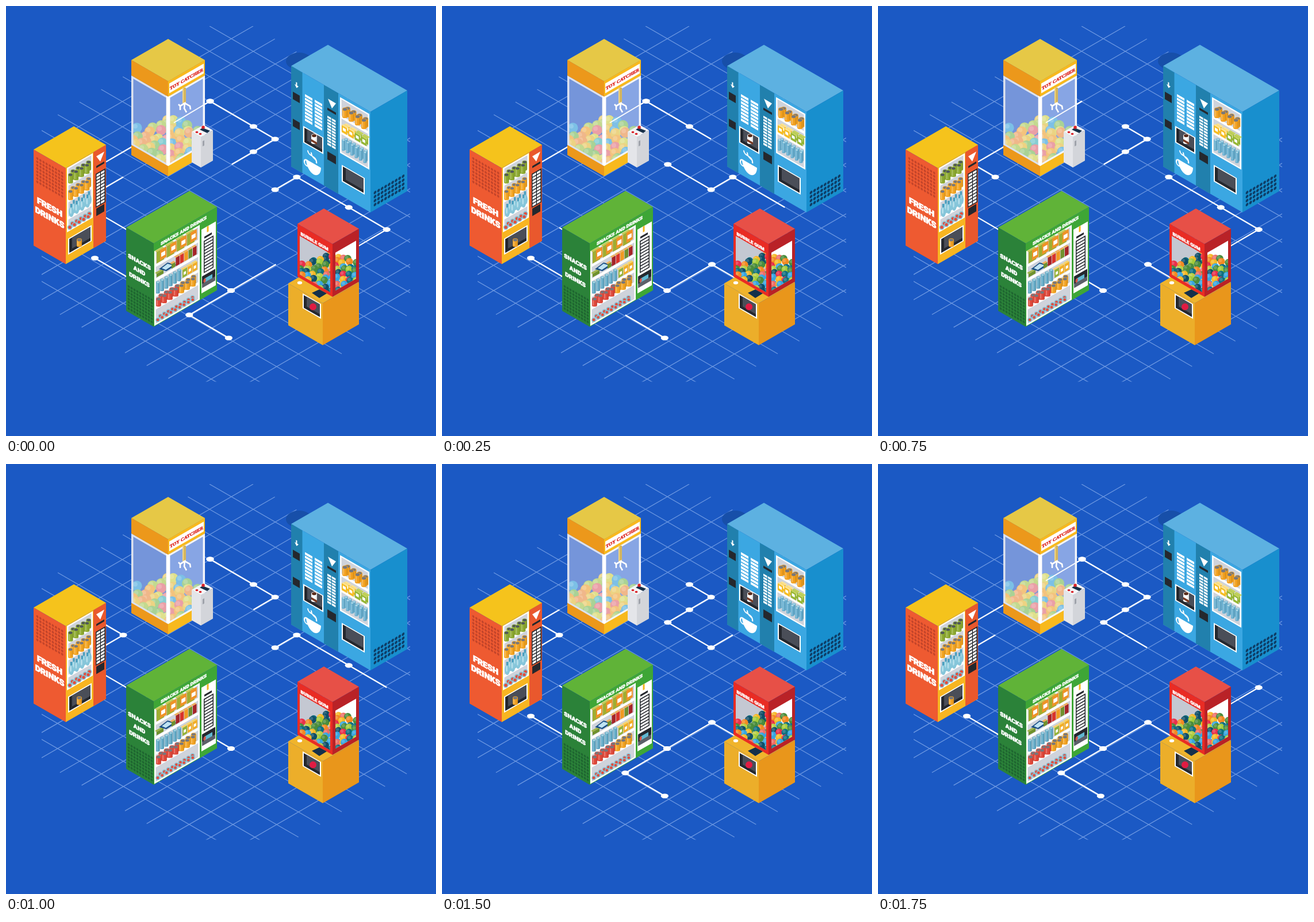
An HTML page with a canvas that plays this animation: 748x748 px, repeating every 2 s.

```html
<!DOCTYPE html>
<html lang="en">
<head>
<meta charset="utf-8">
<title>Vending machines</title>
<style>
html, body { margin: 0; height: 100%; overflow: hidden; background: #1b59c4; }
canvas { display: block; }
</style>
</head>
<body>
<canvas id="stage" width="748" height="748"></canvas>
<script>
const SLOPE = 0.577;
const DARK = '#25282e', SHELF = '#cfd3db';
const CELL = [37.7, 22];
const stage = document.getElementById('stage').getContext('2d');
let g = stage;
let slope = 0; // shear of the wall being drawn

function layer(draw) {
  const c = document.createElement('canvas');
  c.width = c.height = 748;
  g = c.getContext('2d');
  draw();
  return c;
}
function trace(p) {
  g.beginPath();
  for (let i = 0; i < p.length; i += 2) g.lineTo(p[i], p[i + 1]);
}
function poly(color, ...p) {
  trace(p);
  g.fillStyle = color;
  g.fill();
}
function stroke(color, width, ...p) {
  trace(p);
  g.strokeStyle = color;
  g.lineWidth = width;
  g.stroke();
}
function rect(color, x, y, w, h) {
  g.fillStyle = color;
  g.fillRect(x, y, w, h);
}
function oval(color, x, y, rx, ry = rx) {
  g.beginPath();
  g.ellipse(x, y, rx, ry, 0, 0, 7);
  g.fillStyle = color;
  g.fill();
}
function text(str, x, y, size, color = '#fff', family = 'Roboto, "Open Sans", sans-serif') {
  g.font = `900 ${size}px ${family}`;
  g.textAlign = 'center';
  g.fillStyle = g.strokeStyle = color;
  g.lineWidth = size * 0.06;
  g.lineJoin = 'round';
  g.fillText(str, x, y);
  g.strokeText(str, x, y);
  g.lineJoin = 'miter';
}

// Wall with its top left corner at x, y; draw works in unsheared wall units.
function wall(x, y, shear, draw) {
  g.save();
  g.transform(1, shear, 0, 1, x, y);
  slope = shear;
  draw();
  g.restore();
}
function upright(x, y, draw) {
  g.save();
  g.transform(1, -slope, 0, 1, x, y);
  draw();
  g.restore();
}
// Isometric box given by its front top corner and the widths of both walls.
function box(x, y, wl, wr, h, [top, left, right], drawLeft, drawRight) {
  const dl = wl * SLOPE, dr = wr * SLOPE;
  poly(top, x, y, x - wl, y - dl, x - wl + wr, y - dl - dr, x + wr, y - dr);
  wall(x - wl, y - dl, SLOPE, () => {
    rect(left, 0, 0, wl, h);
    drawLeft?.();
  });
  wall(x, y, -SLOPE, () => {
    rect(right, 0, 0, wr, h);
    drawRight?.();
  });
}

function each(cols, rows, dx, dy, draw) {
  for (let i = 0; i < cols; i++)
    for (let j = 0; j < rows; j++) draw(i * dx, j * dy);
}
function holes(color, x, y, cols, rows, dx, dy, r) {
  each(cols, rows, dx, dy, (px, py) => oval(color, x + px, y + py, r, r * 1.1));
}
function keys(x, y, cols, rows, w, h, dx, dy) {
  each(cols, rows, dx, dy, (px, py) => rect('#fff', x + px, y + py, w, h));
}
function tray(x, y, w, h) {
  rect('#fff', x, y, w, h);
  rect(DARK, x + 2, y + 2, w - 4, h - 4);
  rect('#4a4e58', x + 7, y + 2, w - 9, h - 9);
}
function arrow(x, y) {
  poly('#fff', x, y, x + 14, y, x + 7, y + 13);
}
function cabinet(x, y, w, h, levels) {
  rect('#fff', x, y, w, h);
  rect(SHELF, x + 2.5, y + 2.5, w - 5, h - 5);
  for (const level of levels) rect('#fff', x + 2, level, w - 4, 5);
}
function row(n, x, y, dx, item) {
  for (let i = 0; i < n; i++) {
    g.save();
    g.translate(x + i * dx, y);
    item(i);
    g.restore();
  }
}
function twoRows(n, x, y, dx, item) {
  row(n, x + 4.5, y - 4, dx - 0.6, item);
  row(n, x, y, dx, item);
}

// Goods stand on the origin.
function can(w, h, color, lid = '#77777c') {
  upright(0, 0, () => {
    rect(color, 0, -h, w, h);
    oval(color, w / 2, 0, w / 2, w / 4);
    rect('rgba(255,255,255,.25)', 1, -h, w / 4, h);
    rect('rgba(0,0,0,.1)', w * 0.75, -h, w / 4, h);
    oval(color, w / 2, -h, w / 2, w / 3);
    oval(lid, w / 2, -h, w / 2 - 1, w / 3 - 0.7);
  });
}
function bottle(w, h) {
  upright(0, 0, () => {
    oval('#86c6da', w / 2, -h * 0.36, w / 2, h * 0.4);
    rect('#4b9fbf', w * 0.3, -h, w * 0.4, h * 0.28);
    oval('#b5deea', w * 0.4, -h * 0.45, w / 6, h * 0.24);
  });
}
function carton(w, h, color, lid) {
  const d = 3 * Math.sign(slope);
  rect(color, 0, -h, w, h);
  poly(lid, 0, -h, w, -h, w + d, -h - 3.5, d, -h - 3.5);
}
function endCap(r) {
  upright(0, 0, () => {
    oval('#86bfd0', 0, 0, r);
    oval('#e44b3c', 0, 0, r * 0.62);
  });
}

let seed = 20231;
function random() {
  seed = seed * 16807 % 2147483647;
  return seed / 2147483647;
}
// Balls behind a pane; their surface runs from height ya to yb.
function heap(x, y, w, h, ya, yb, r, colors) {
  g.save();
  g.beginPath();
  g.rect(x, y, w, h);
  g.clip();
  let last = 0;
  for (let by = Math.min(ya, yb); by < y + h + r; by += r * 1.1)
    for (let bx = x + random() * r; bx < x + w + r; bx += r * 1.65) {
      last += 1 + Math.floor(random() * (colors.length - 1));
      const color = colors[last % colors.length];
      if (by < ya + (yb - ya) * (bx - x) / w) continue;
      upright(bx, by + (random() - 0.5) * r, () => {
        oval(color, 0, 0, r);
        oval('rgba(255,255,255,.18)', -r * 0.3, -r * 0.3, r * 0.45);
      });
    }
  g.restore();
}

function grid() {
  rect('#1b59c4', 0, 0, 748, 748);
  g.beginPath();
  g.rect(62, 35, 641, 618.5);
  g.clip();
  for (let k = 0; k < 15; k++) {
    const dx = CELL[0] * k, dy = CELL[1] * k, up = dy * 1.011;
    stroke('#6c98e2', 1.3, 354 - dx, 35 + dy, 961 - dx, 385 + dy);
    stroke('#6c98e2', 1.3, 430 + dx, 35 + up, -170 + dx, 381 + up);
  }
  oval('#174fa9', 510, 96, 23, 15);
}

function toyCatcher() {
  const soft = ['#ecd383', '#a9d295', '#7cc0e6', '#ea9fa6', '#f0b78a', '#86cdd2', '#dfe08c', '#f3c37d', '#c3d98f'];
  function pane(glass, base, frame, edge, ya, yb) {
    rect(base, 0, 0, 64, 165);
    rect(glass, 0, 27, 64, 120);
    heap(2, 27, 60, 118, ya, yb, 9, soft);
    g.strokeStyle = frame;
    g.lineWidth = 3.5;
    g.strokeRect(1.7, 28.7, 60.6, 117);
    rect('#fff', edge, 27, 3, 120);
  }
  box(282, 131, 64, 64, 165, ['#e6c846', '#ec981b', '#f8b91d'],
    () => pane('#7595da', '#ec981b', '#dde2ee', 61, 120, 66),
    () => {
      pane('#87a5e4', '#f8b91d', '#f4f6fb', 0, 64, 118);
      rect('#fff', 2, 5, 60, 17);
      text('TOY CATCHER', 32, 17, 7.9, '#de2a22', '"Liberation Serif", serif');
    });
  // claw
  rect('#d6b65c', 307, 142, 6, 27);
  rect('#efd485', 307, 142, 2, 27);
  stroke('#fff', 2.6, 300, 171, 303, 174, 311, 169, 320, 174, 321, 180);
  stroke('#fff', 2.6, 303, 181, 303, 174, 311, 169, 310, 178, 314, 185);
  // control box
  box(339, 228, 16, 21, 53, ['#f5f5f7', '#e4e5e9', '#d3d5da'], null, () => rect('#9fa3ab', 3, 9, 3, 9));
  poly('#173049', 337, 215, 342, 212, 355, 217, 350, 221);
  stroke('#173049', 2, 344, 217, 343, 211);
  oval('#d9232a', 343, 211, 2.8);
  for (const x of [332, 338]) oval('#d9232a', x, x / 2 + 53.5, 2.4, 1.8);
}

function coffeeSign(x, y) {
  g.strokeStyle = g.fillStyle = '#fff';
  g.lineWidth = 2.2;
  g.beginPath();
  g.ellipse(x - 12, y + 6, 4, 5, 0, 0, 7);
  for (const d of [0, 6]) {
    g.moveTo(x - 10 + d, y - 17);
    g.bezierCurveTo(x - 10 + d, y - 6, x + 7, y - 18 + d, x + 5, y - 3);
  }
  g.stroke();
  g.beginPath();
  g.ellipse(x, y, 13, 19, 0, 0, Math.PI);
  g.fill();
}

function coffeeMachine() {
  box(634, 184, 138, 64, 175, ['#5db1e1', '#3ba7e2', '#188fce'], () => {
    rect('#2180ad', 0, 0, 19.5, 175);
    rect('#2180ad', 57, 0, 25, 175);
    rect('#fff', 8.4, 23, 2, 6);
    poly('#fff', 6, 28, 13, 28, 9.5, 33);
    for (const y of [43, 90]) rect(DARK, 3, y, 12, 13);
    keys(24, 35, 2, 8, 13, 4.2, 17, 6);
    tray(21, 92, 35, 29);
    row(1, 35, 113, 0, () => {
      can(10, 12, '#fff', '#5a2d1c');
      rect('#7a3a24', 0, -6, 10, 4);
    });
    coffeeSign(39, 147);
    arrow(64, 20);
    rect(DARK, 63, 36, 15, 4);
    keys(63, 50, 2, 10, 6.6, 3.6, 7.8, 5.2);
    rect(DARK, 63, 112, 15, 14);
    cabinet(85, 5, 51, 97, [36, 63]);
    twoRows(4, 89, 37, 11, () => can(9.5, 13, '#f2a01f'));
    twoRows(4, 88, 64, 11.3, i => {
      carton(9.5, 12, i < 2 ? '#f6bd24' : '#96b637', i < 2 ? '#fde28d' : '#c3d25a');
      rect('#fff', 2, -9, 5, 5);
    });
    twoRows(6, 88, 95, 7.5, () => can(6, 17, '#68afd0', '#b3dbe8'));
    tray(88, 121, 40, 29);
  }, () => holes('#0e3d66', 8, 145, 9, 4, 6.1, 7, 2.4));
}

function drinkMachine() {
  box(104, 282, 56, 70, 167, ['#f5c31c', '#ee5a31', '#f8b521'], () => {
    holes('#c2442a', 6.5, 12, 9, 8, 5.4, 5.8, 1.9);
    text('FRESH', 28, 89, 14.2);
    text('DRINKS', 28, 107, 14.2);
  }, () => {
    rect('#e9582d', 48, 0, 22, 167);
    cabinet(2, 1, 45, 112, [28, 57, 87]);
    twoRows(4, 4, 27, 9.6, () => can(8.5, 13, '#8eab32', '#50575a'));
    twoRows(4, 4, 56, 9.6, () => can(8.5, 13, '#f4a522'));
    twoRows(4, 5, 87, 9.4, () => bottle(9, 22));
    twoRows(5, 7, 107, 8, () => endCap(4.2));
    tray(4, 125, 41, 28);
    row(1, 19, 146, 0, () => can(9, 10, '#f0a021'));
    arrow(53, 10);
    rect(DARK, 53, 27, 14, 3.5);
    rect(DARK, 52, 40, 17, 59);
    keys(53.5, 42, 2, 10, 6.2, 4, 7.6, 5.7);
    rect(DARK, 53, 101, 14, 13);
  });
}

function snackMachine() {
  const packs = ['#70902d', '#a52428', '#d9342b', '#f19a22'];
  box(257, 413, 48, 110, 145, ['#60b338', '#2b8239', '#3ea636'], () => {
    holes('#1e6530', 4.5, 100, 9, 8, 5, 5.5, 1.8);
    ['SNACKS', 'AND', 'DRINKS'].forEach((word, i) => text(word, 23, 50 + 15.5 * i, 10));
  }, () => {
    text('SNACKS AND DRINKS', 52, 10.5, 8);
    cabinet(1, 14, 79, 130, [38, 63, 90, 112]);
    row(4, 5, 38, 17.6, () => {
      carton(13, 20, '#a0ad31', '#c4c952');
      rect('#ef9227', 6, -20, 11, 18);
      rect('#fff', 8, -14, 7, 7);
    });
    row(1, 5, 62, 0, () => carton(12, 6, '#6f912d', '#9fb347'));
    poly('#1b4f86', 9, 50, 24, 47, 40, 60, 22, 61);
    poly('#bfe3f3', 14, 51, 24, 49, 33, 57, 21, 58);
    row(6, 31, 62, 7.4, i => carton(6.5, i ? 15 : 8, packs[i % 4], '#f0b05c'));
    row(6, 4, 88, 7.4, () => can(6.5, 18, '#61a9c6', '#a9d5e2'));
    row(3, 50, 89, 8.8, i => {
      carton(8, 14, i ? '#f2ae25' : '#97b338', '#f8d469');
      rect('#fff', 2, -9, 4, 5);
    });
    twoRows(7, 4, 110, 10, i => can(8.8, 11, i < 4 ? '#e0493b' : '#f3a423'));
    twoRows(9, 7, 137, 7.6, () => endCap(3.8));
    rect('#fff', 83, 24, 25, 111);
    rect('#f3b51f', 92.5, 24, 3, 10);
    rect(DARK, 88, 39, 13, 3.5);
    rect(DARK, 87, 46, 17, 56);
    keys(88.5, 48, 1, 10, 14, 3.6, 0, 5.4);
    rect(DARK, 84, 106, 23, 20);
    rect('#5c6069', 84, 119, 23, 7);
    rect('#60b7d1', 88, 112, 14, 7);
    oval('#d95347', 88.5, 115.5, 2.2, 3.5);
  });
}

function gumMachine() {
  const bright = ['#ee6e66', '#0f4f68', '#a4cb3b', '#37a5df', '#f28a22', '#4a8d3c', '#0f6f80', '#e8304b', '#b9cf45', '#f5b927'];
  box(551, 517, 60, 63, 73, ['#f0b42c', '#ecae2a', '#e9961b'], () => {
    tray(25, 3, 32, 26);
    upright(43, 16, () => oval('#e11b43', 0, 0, 6));
  });
  oval('#fff', 511, 481.5, 4.2, 2.8);
  box(568, 414, 61, 46, 92, ['#e75047', '#e92c24', '#b92227'], () => {
    text('BUBBLE GUM', 29.5, 16.5, 7.8);
    rect('#c4c8d2', 4, 19, 53, 67);
    heap(4, 19, 53, 67, 66, 18, 6.3, bright);
  }, () => {
    rect('#fff', 5, 18, 36, 66);
    heap(5, 18, 36, 66, 22, 56, 6.3, bright);
  });
  poly('#14314b', 532, 499, 545, 493, 558, 500, 545, 508);
}

// Junctions, reached from a starting point by [cells, down 1 / up -1].
const at = {};
function walk(name, x, y, moves) {
  at[name] = [x, y];
  for (const [next, [cells, dir]] of Object.entries(moves)) {
    x += CELL[0] * cells;
    y += CELL[1] * cells * dir;
    at[next] = [x, y];
  }
}
walk('c', 355, 165.5, { b: [-4, -1], a: [-0.8, -1] });
walk('c', 355, 165.5, {
  d: [2, 1], e: [1, 1], f: [-1, -1], g: [-1, -1], h: [2, 1],
  i: [1, -1], j: [2.4, 1], k: [1.75, 1], l: [-1.4, -1]
});
walk('n', 204, 297.5, { m: [-0.9, 1] });
walk('n', 204, 297.5, { o: [-0.9, -1] });
walk('v', 391.5, 495, { u: [-0.8, 1], q: [-3.9, 1], r: [-0.27, 1], p: [-0.9, 1] });
walk('v', 391.5, 495, { w: [2.07, -1], x: [1.1, 1] });
walk('v', 391.5, 495, { y: [-1.93, -1], z: [1.82, 1] });
walk('s', 154.5, 438.5, { t: [1.6, 1] });

// Routes lit in each step; a capital letter marks a dot.
const steps = [
  'abCDEFg HIJKl on pq St uVw VYZ',
  'abCDe GHIj rq St uVWx yZ',
  'abCd FGHi Kl uVWx Z',
  'abc DEFg IJKl mN pq uV Wx',
  'CDEf HIJk mNo pq uV',
  'Bc FGHIj mNo pq St uVW VY',
  'ab DEFGHi mNo rq St uVWx VYZ',
  'abCDEFGh Kl on St uVWx VYZ'
];

function routes(step) {
  for (const route of step.split(' ')) {
    const pts = [...route].map(ch => at[ch.toLowerCase()]);
    stroke('#fff', 2.2, ...pts.flat());
    [...route].forEach((ch, i) => {
      if (ch < 'a') oval('#fff', ...pts[i], 6.6, 4.1);
    });
  }
}

const backdrop = layer(grid);
const machines = layer(() => {
  toyCatcher();
  coffeeMachine();
  drinkMachine();
  snackMachine();
  gumMachine();
});
g = stage;
const start = performance.now();

function frame() {
  const step = steps[Math.floor((performance.now() - start) % 2000 / 250)];
  g.drawImage(backdrop, 0, 0);
  routes(step);
  g.drawImage(machines, 0, 0);
  // the route seen through the glass
  if (/bc/i.test(step)) stroke('#fff', 2, 292, 203, ...at.c);
  if (step.includes('C')) oval('#fff', ...at.c, 6.6, 4.1);
  requestAnimationFrame(frame);
}
frame();
</script>
</body>
</html>
```
